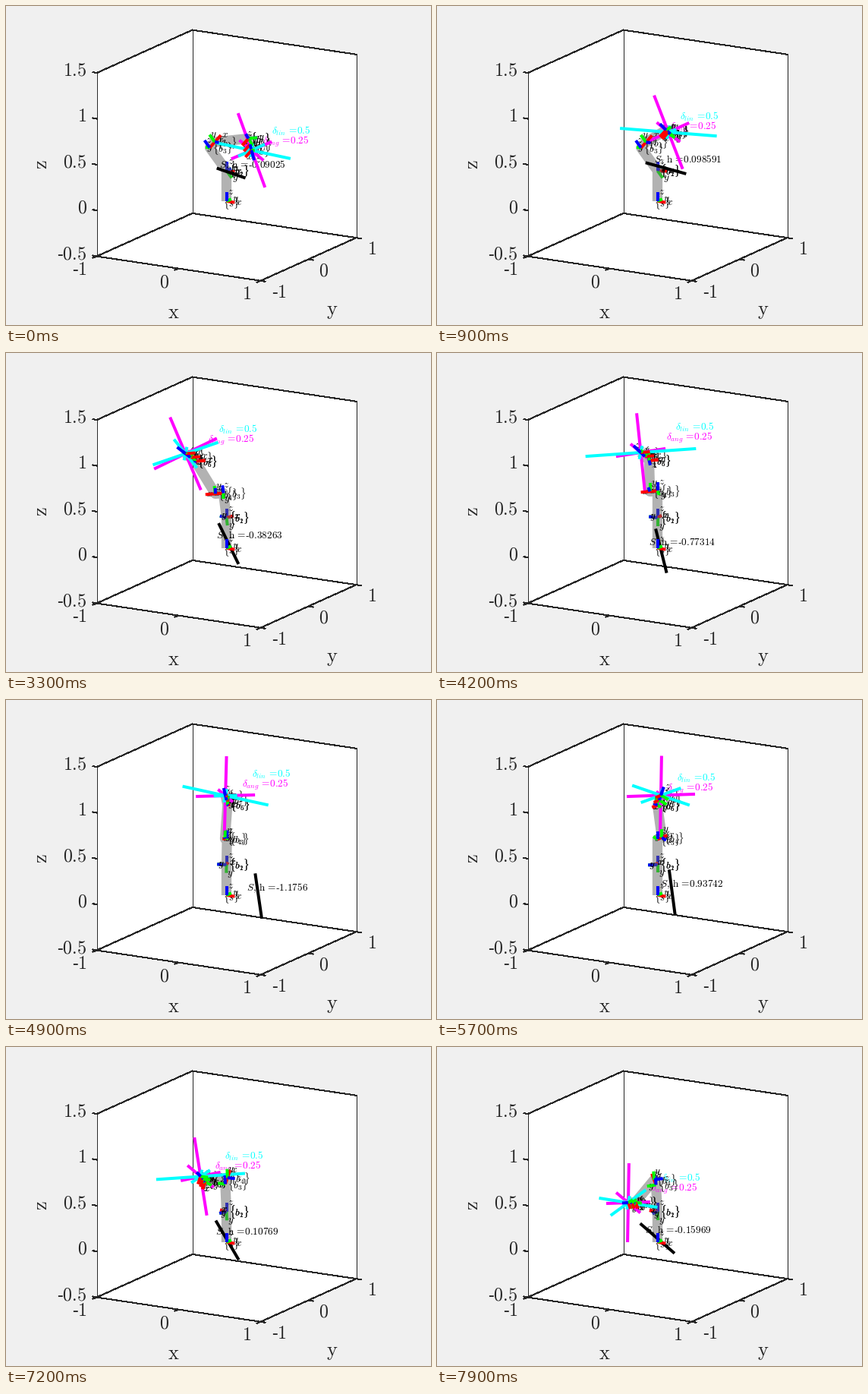
Animation of 560x420 px, one loop 8 s. Source, as a matplotlib script:

```python
import numpy as np
import matplotlib.pyplot as plt
from matplotlib.animation import FuncAnimation

W, H, DPI = 560, 420, 100
STEP, FRAMES = 100, 80
PX = 72 / DPI
INK = "0.15"
RGB = ((1, 0, 0), (0, 1, 0), (0, 0, 1))
AXIS = 12.5  # screen length of a frame axis seen side on
POSES = np.array([0, 1900, 3300, 4200, 5700, 6500, 7900.0])

plt.rcParams["mathtext.fontset"] = "cm"
fig = plt.figure(figsize=(W / DPI, H / DPI), dpi=DPI, facecolor="#f0f0f0")
ax = fig.add_axes([0, 0, 1, 1])
ax.set_xlim(-0.5, W - 0.5)
ax.set_ylim(H - 0.5, -0.5)
ax.axis("off")


def path(*vals):
    """Smooth curve through one value per pose, starting from rest."""
    v = np.array(vals, float)
    slope = np.gradient(v, POSES, axis=0)
    slope[0] = 0

    def at(t):
        i = min(max(np.searchsorted(POSES, t, "right") - 1, 0), len(POSES) - 2)
        d = POSES[i + 1] - POSES[i]
        s = (t - POSES[i]) / d
        return ((1 + 2 * s) * (1 - s) ** 2 * v[i] + s * (1 - s) ** 2 * d * slope[i]
                + s * s * (3 - 2 * s) * v[i + 1] + s * s * (s - 1) * d * slope[i + 1])
    return at


def polar(length, deg):
    """Screen vector, angle measured upwards from the right."""
    a = np.radians(deg)
    return length * np.array([np.cos(a), -np.sin(a)])


def line(color, width, z, **kw):
    return ax.plot([], [], color=color, lw=width * PX, zorder=z,
                   solid_capstyle="butt", **kw)[0]


def text(x, y, s, size, color=INK, z=4, **kw):
    return ax.text(x, y, f"${s}$", fontsize=size * PX, color=color, zorder=z, **kw)


def number(v):
    return f"{v:.5g}".replace("-", "\u2010")


# View from azimuth 30, elevation 15 degrees
BASE = np.array([290, 256.5])
BASIS = np.array([[108, 16.1], [63, -28.3], [0, -120.7]])


def project(*p):
    return BASE + np.array(p) @ BASIS


def edge(p, q):
    ax.plot(*zip(p, q), color=INK, lw=PX, zorder=0.5, aa=False)


def box():
    lo, hi = -0.5, 1.5
    hexagon = [project(*p) for p in ((-1, -1, hi), (-1, 1, hi), (1, 1, hi),
                                     (1, 1, lo), (1, -1, lo), (-1, -1, lo))]
    ax.add_patch(plt.Polygon(hexagon, fc="w", ec="none", zorder=0))
    for p, q in zip(hexagon, hexagon[1:] + hexagon[:1]):
        edge(p, q)
    for q in hexagon[1::2]:
        edge(project(-1, 1, lo), q)

    def tick(p, dx, dy):
        q = project(*p)
        edge(q, q + (dx, dy))
        return q

    for v in (-0.5, 0, 0.5, 1, 1.5):
        q = tick((-1, -1, v), -5, -1)
        text(106, q[1] - 3.5, number(v), 24, ha="right", va="center")
    for v in (-1, 0, 1):
        q = tick((v, -1, lo), -5, 2)
        text(q[0] - 12.5, q[1] + 17.5, number(v), 24, ha="right", va="center")
        q = tick((1, v, lo), 6, 1)
        text(q[0] + 14, q[1] + 15, number(v), 24, va="center")
    for s, x, y, rot in (("x", 220, 404, 0), ("y", 429, 401, 0), ("z", 47, 208, 90)):
        text(x, y, rf"\mathrm{{{s}}}", 26.4, ha="center", va="center", rotation=rot)


box()

# Arm: screen positions of the joints, and the elbow's x axis
SHOULDER = project(0, 0, 0.333)
elbow = path((268, 186), (272, 186), (286, 184), (290, 181), (290, 183), (289, 180), (288, 181))
wrist = path((319, 174), (271, 146), (249, 142), (279, 141), (290, 138), (268, 153), (261, 204))
hand = path((323, 189.5), (270, 131.5), (236, 132), (268, 130.5), (294.5, 125),
            (266, 141), (251.5, 204.5))
elbow_x = path((8, -9), (4, -7), (-13, 1), (-12, 1), (7, -3), (8, -10), (-3, -8))

# Ellipsoids: tilt and size of their leading axes
ang_tilt = path(20, 23, 23, 6, -1, 13, -1)
ang_side = path(29, 34, 46, 33, 45, 29, 29)
lin_turn = path(-12, 8.5, 19, 4, -19, 7, -9)
lin_size = path(52.5, 74, 45.5, 73, 40, 66.5, 39)
lin_cross = path(24, 0, -51, -20, 20, 30, 36)
note_dx = path(27, 6, 43, 46, 21, 22, 43.5)


# The screw axis runs far off while rotation almost stops
def burst(t):
    u = (t - 5150) / 110
    return 215 / (1 + u * u), 3 * u / (1 + u * u)


screw_at = path((296, 219.5), (305, 212.5), (292, 250.5), (292, 260), (301, 252.5),
                (293, 255), (289.5, 251.5))
screw_turn = path(-19, -20, -64, -76, -82.5, -75, -41)
PITCH = np.array([-0.09025, 0.24215, -0.38263, -0.77314, 0.93742, 0.40266, -0.15969])
pitch = path(*(PITCH - burst(POSES)[1]))


def frame(x, z):
    """Screen axes of a right-handed frame from its x and z, with z facing the viewer."""
    def depth(v):
        return np.sqrt(max(AXIS ** 2 - v @ v, 1))
    zd = -depth(z)
    xd = np.clip(-(x @ z) / zd, -depth(x), depth(x))
    y = np.array([z[1] * xd - zd * x[1], zd * x[0] - z[0] * xd]) / AXIS
    return x, y, z


def turned(axes):
    """Next joint's frame: a quarter turn about x."""
    x, y, z = axes
    return x, z, -y


class Triad:
    def __init__(self, name, z=6.5, offset=(3, 6)):
        self.lines = [line(c, 4, z) for c in RGB]
        self.tips = [text(0, 0, s, 13.3, "k") for s in "xyz"]
        self.name = text(0, 0, rf"\{{{name}\}}", 13.3, "k")
        self.offset = np.array(offset)

    def place(self, p, axes):
        for ln, tip, v in zip(self.lines, self.tips, axes):
            q = p + v
            ln.set_data(*zip(p, q))
            tip.set_position(q + (1, 3))
        self.name.set_position(p + self.offset)


link = line("0.4", 13.3, 3, alpha=0.5, solid_joinstyle="round")
screw = line("k", 4, 5)
screw_text = text(0, 0, "S", 13.3, "k")
lin_lines = [line("cyan", 4, 6) for _ in range(3)]
ang_lines = [line("magenta", 4, 5.5) for _ in range(3)]
lin_text = text(0, 0, r"\delta_{lin}\,=\!0.5", 13.3, "cyan")
ang_text = text(0, 0, r"\delta_{ang}\,=\!0.25", 13.3, "magenta")
Triad("s", offset=(-5, 7)).place(BASE, 0.1 * BASIS)
b1, b2 = Triad("b_1", 2), Triad("b_2", 2)
b3, b4, b5, b6, b7 = (Triad(f"b_{i}") for i in range(3, 8))
tool = Triad("b")


def draw_arm(t):
    e, w, p, ex = elbow(t), wrist(t), hand(t), elbow_x(t)
    bend = e + 0.825 * ex
    link.set_data(*zip(BASE, SHOULDER, e, bend, w, p))

    a = np.pi * t / 8000
    c, s = np.cos(a), np.sin(a)
    sx, sy, up = 0.1 * np.array([[c, s, 0], [-s, c, 0], [0, 0, 1]]) @ BASIS
    upper, fore, last = (e - SHOULDER) / 3.16, (w - bend) / 3.84, 0.85 * (p - w)
    b1.place(SHOULDER, (sx, sy, up))
    b2.place(SHOULDER, (sx, -upper, sy))
    axes = frame(ex, upper)
    b3.place(e, axes)
    b4.place(bend, turned(axes))
    axes = frame(-ex, fore)
    b5.place(w, axes)
    b6.place(w, turned(axes))
    axes = frame(-ex, last)
    b7.place((w + p) / 2, axes)
    tool.place(p, axes)


def draw_ellipsoids(t):
    p, tilt, side, size = hand(t), ang_tilt(t), ang_side(t), lin_size(t)
    angular = polar(52, 90 + tilt), polar(side, tilt + 3), polar(0.8 * (55 - side), -40)
    linear = polar(size, lin_turn(t)), polar(0.7 * (80 - size), lin_cross(t)), polar(9, 78)
    for ln, v in zip(ang_lines + lin_lines, angular + linear):
        ln.set_data(*zip(p - v, p + v))
    dx = note_dx(t)
    at = p + (dx, -10.5 - 0.4 * dx)
    lin_text.set_position(at)
    ang_text.set_position(at + (-13, 13))


def draw_screw(t):
    far, surge = burst(t)
    c = screw_at(t) + (far, 0)
    v = polar(30 - 10 * np.exp(-t / 600), screw_turn(t))
    screw.set_data(*zip(c - v, c + v))
    screw_text.set_position(c + (-16, -7))
    screw_text.set_text(rf"$S,\,\mathrm{{h}}\,=\!{number(pitch(t) + surge)}$")


def draw(i):
    t = i * STEP
    draw_arm(t)
    draw_ellipsoids(t)
    draw_screw(t)


anim = FuncAnimation(fig, draw, frames=FRAMES, interval=STEP,
                     init_func=lambda: draw(0), repeat=True, repeat_delay=0, blit=False)
plt.show()
```
